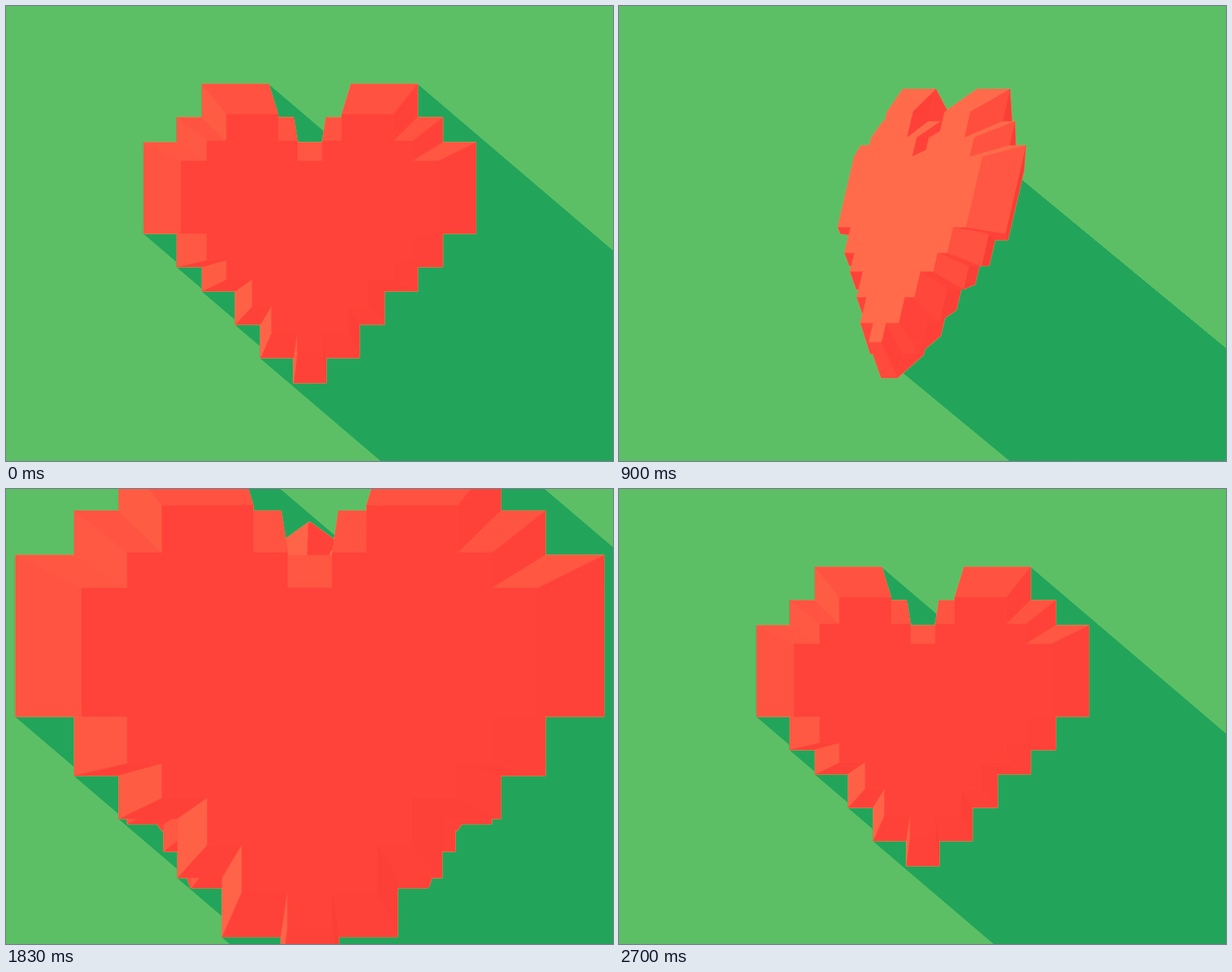
An HTML page with a canvas for the animation above (2730 ms loop, 800 px wide and 600 px high).

```html
<!DOCTYPE html>
<html>
<head>
<meta charset="utf-8">
<title>Heart burst</title>
<style>
  html, body { margin: 0; height: 100%; overflow: hidden; background: #5cbf65; }
  canvas { display: block; }
</style>
</head>
<body>
<canvas id="stage" width="800" height="600"></canvas>
<script>
const ctx = document.getElementById('stage').getContext('2d');
const LOOP = 2730, STEP = 30, SPIN = 1500, POP = 1640, BURST = 1830;
const DEPTH = 33;
const GREEN = '#5cbf65', SHADE = '#22a55b', RIM = '#e8904c';
const LIGHT = [-0.9, -0.75, 0.25];

const rad = a => a * Math.PI / 180;
const clamp = u => Math.min(1, Math.max(0, u));
const smooth = u => (u = clamp(u), u * u * (3 - 2 * u));
const sine = u => (1 - Math.cos(Math.PI * u)) / 2;

// Stair-stepped heart around its centre, clockwise from the notch
function heartOutline() {
  const col = i => 21.5 + 38.4 * i + (i % 2 ? 5.3 : 0);
  const half = [[col(0), -120], [col(0), -153], [54.5, -153], [54.5, -197]];
  let y = -197;
  for (const [i, drop] of [[3, 44], [4, 33], [5, 120], [4, 44], [3, 32], [2, 44], [1, 44], [0, 33]]) {
    half.push([col(i), y], [col(i), y += drop]);
  }
  return half.concat(half.map(([x, y]) => [-x, y]).reverse());
}
const outline = heartOutline();

function trace(points) {
  ctx.beginPath();
  points.forEach(p => ctx.lineTo(p[0], p[1]));
  ctx.closePath();
}

function paint(points, color) {
  trace(points);
  ctx.fillStyle = ctx.strokeStyle = color;
  ctx.lineWidth = 0.5;
  ctx.fill();
  ctx.stroke();
}

function tone(n) {
  const p = n.reduce((s, v, i) => s + v * LIGHT[i], 0) / Math.hypot(...n);
  const lift = 41 * clamp(p) ** 2.4;
  const dark = 15 * Math.max(0, -p - 0.5);
  return `rgb(${255 - dark},${66 + lift - dark / 2},${57 + lift * 0.45 - dark / 2})`;
}

const sub = (a, b) => a.map((v, i) => v - b[i]);
const cross = (a, b) => [
  a[1] * b[2] - a[2] * b[1], a[2] * b[0] - a[0] * b[2], a[0] * b[1] - a[1] * b[0]
];

// Visible faces of one heart, back to front
function solid({ x, y, size, turn = 0, tilt = 0, roll = 0 }) {
  const [ct, st, cp, sp, cr, sr] =
    [turn, tilt, roll].flatMap(a => [Math.cos(rad(a)), Math.sin(rad(a))]);
  const place = ([X, Y, Z]) => {
    const v = Y * cp - Z * sp, w = Y * sp + Z * cp, u = X * ct + w * st;
    return [u * cr - v * sr, u * sr + v * cr, w * ct - X * st];
  };
  const toScreen = p => [x + p[0] * size, y + p[1] * size];

  const front = ct >= 0 ? 1 : -1;
  const rim = outline.map(([X, Y]) => place([X, Y, 0]));
  const faces = [];
  for (const side of [-front, front]) {
    const cap = outline.map(([X, Y]) => place([X * 0.775, Y * 0.797, side * DEPTH]));
    const walls = [];
    rim.forEach((a, i) => {
      const j = (i + 1) % rim.length, b = rim[j];
      const n = cross(sub(b, a), sub(cap[i], a)).map(v => v * side);
      if (n[2] <= 0.001) return;
      const quad = [a, b, cap[j], cap[i]];
      walls.push({ z: quad.reduce((s, p) => s + p[2], 0), points: quad.map(toScreen), color: tone(n) });
    });
    faces.push(...walls.sort((a, b) => a.z - b.z));
    if (side === front) faces.push({ points: cap.map(toScreen), color: tone(place([0, 0, side])) });
  }
  return faces;
}

// Long shadow: a folded copy of the outline swept to the lower right
function drawShadow(t, { size, turn, tilt }) {
  const fold = smooth(t / 540) * smooth((SPIN - t) / 600);
  const shear = Math.sin(rad(tilt)) * Math.sin(rad(turn)) + 0.15 * fold;
  const slope = 0.853 - 0.027 * fold;
  const caster = outline.map(([X, Y]) => [
    400 - 11 * fold + size * ((1 - fold) * X + shear * Y),
    300 + 4 * fold + size * (1 - 0.09 * fold) * Y
  ]);
  const far = p => [p[0] + 1200, p[1] + 1200 * slope];
  paint(caster, SHADE);
  caster.forEach((a, i) => {
    const b = caster[(i + 1) % caster.length];
    paint([a, b, far(b), far(a)], SHADE);
  });
}

// The main heart spins once, then pops
function mainHeart(t) {
  const u = clamp(t / SPIN);
  return {
    x: 400.5, y: 300,
    size: 1 + 0.778 * smooth((t - POP) / 200) * (1 - smooth((t - 1850) / 415)),
    turn: 360 * sine(1 - (1 - u) ** 1.436),
    tilt: 15 * Math.sin(Math.PI * u ** 1.357)
  };
}

// Two rings of five hearts fly out, tips first; those at the lower left come closer
function burstHearts(t) {
  const out = clamp((t - BURST) / 690);
  if (t <= POP || out === 1) return [];
  const size = (0.62 + 0.48 * smooth((t - POP) / 200)) * (1 - out);
  const y = 310 - 158 * out;
  const hearts = [];
  for (let i = 9; i >= 0; i--) {
    const dir = 18 + 36 * i, outer = i % 2 === 0;
    const near = 1 + 0.4 * out / 0.35 * Math.max(0, Math.cos(rad(dir - 145))) ** 2;
    const reach = 780 * out * near * (outer ? 1 : 0.81);
    hearts.push({
      x: 400 + reach * Math.cos(rad(dir)),
      y: y + reach * Math.sin(rad(dir)),
      size: near * (outer ? Math.min(0.75, size) : size),
      roll: dir - 90
    });
  }
  hearts.push({ x: 400, y, size, roll: 180 });
  return hearts;
}

function draw(t) {
  const main = mainHeart(t);
  ctx.fillStyle = GREEN;
  ctx.fillRect(0, 0, 800, 600);
  drawShadow(t, main);

  const faces = [...burstHearts(t), main].flatMap(solid);
  ctx.strokeStyle = RIM;
  ctx.lineWidth = 1.4;
  ctx.lineJoin = 'bevel';
  faces.forEach(f => { trace(f.points); ctx.stroke(); });
  faces.forEach(f => paint(f.points, f.color));
}

const start = performance.now();
function tick() {
  const t = (performance.now() - start) % LOOP;
  draw(Math.floor(t / STEP) * STEP);
  requestAnimationFrame(tick);
}
tick();
</script>
</body>
</html>
```
